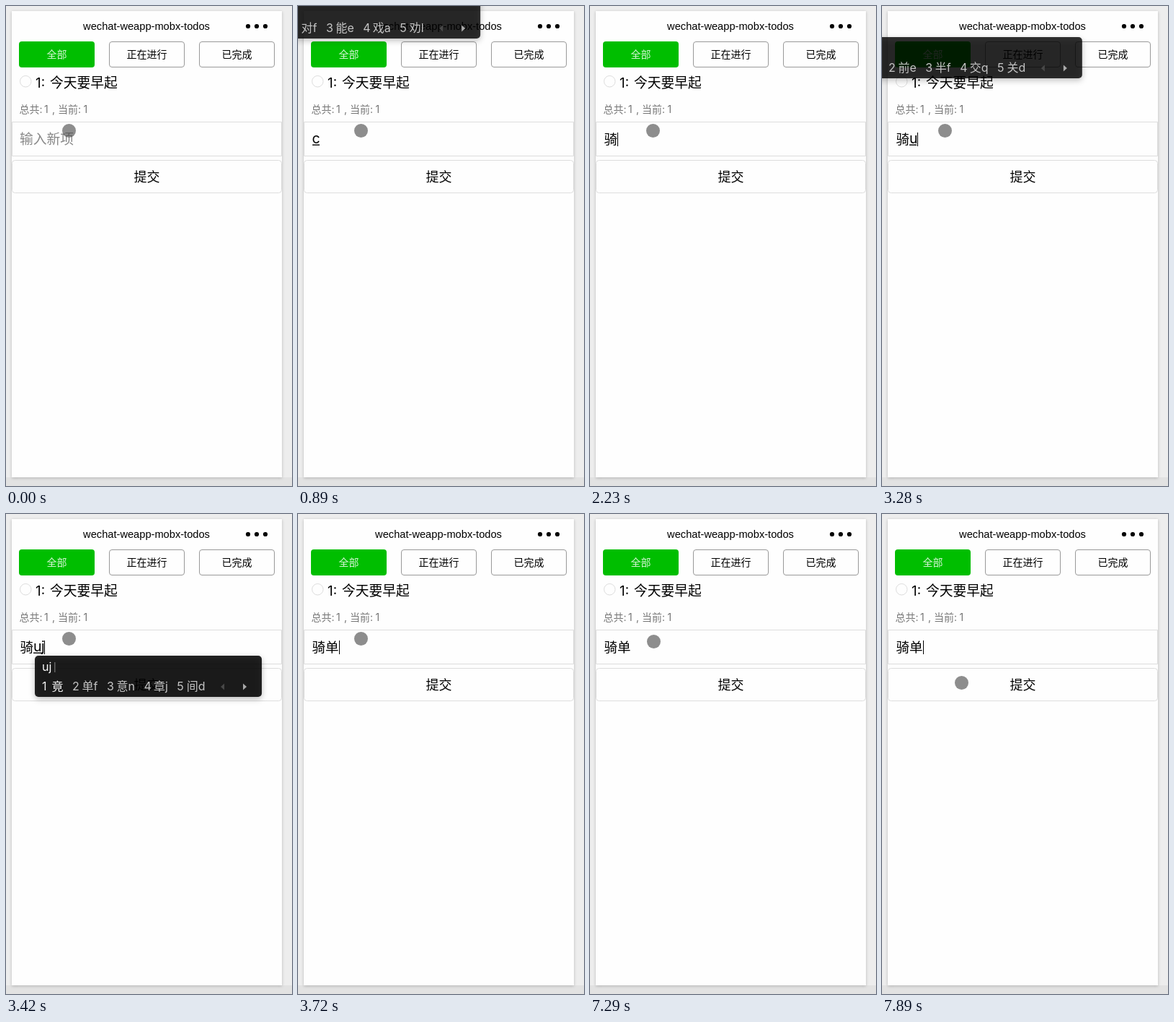
Animation, 397 px wide and 664 px high, one loop 8000 ms. Source, as an HTML page with a canvas:

```html
<!DOCTYPE html>
<html lang="zh-CN">
<head>
<meta charset="utf-8">
<title>todos</title>
<style>
  html, body { margin: 0; width: 100%; height: 100%; overflow: hidden; background: #ededed; }
  canvas { display: block; width: 397px; height: 664px; }
</style>
</head>
<body>
<canvas id="stage"></canvas>
<script>
const LOOP = 8000;
const SANS = "Inter, 'Noto Sans CJK SC', 'Noto Sans CJK', sans-serif";
const canvas = document.getElementById('stage');
const ctx = canvas.getContext('2d');
const scale = window.devicePixelRatio || 1;
canvas.width = 397 * scale;
canvas.height = 664 * scale;

// Input states: text already committed, letters being composed, caret x.
const typing = [
  { at: 0, done: '', keys: '', caret: 19 },
  { at: 440, done: '', keys: 'c', caret: 31,
    popup: { x: -61, y: -12, alpha: .8, list: ['以', '对f', '能e', '戏a', '劝l'] } },
  { at: 1490, done: '', keys: 'cd', caret: 44,
    popup: { x: 22, y: 196, alpha: .86, list: ['参', '骑s', '叁d', '驮y', '畚l'] } },
  { at: 1630, done: '', keys: 'cds', caret: 51,
    popup: { x: 22, y: 196, alpha: .86, list: ['骑', '骑k', '参校u', '参酌g', '骠s'] } },
  { at: 2230, done: '骑', keys: '', caret: 38 },
  { at: 3280, done: '骑', keys: 'u', caret: 49,
    popup: { x: -43, y: 43, alpha: .8, list: ['产', '前e', '半f', '交q', '关d'] } },
  { at: 3420, done: '骑', keys: 'uj', caret: 53,
    popup: { x: 40, y: 196, alpha: .86, list: ['竟', '单f', '意n', '章j', '间d'] } },
  { at: 3570, done: '骑', keys: 'ujf', caret: 58,
    popup: { x: 40, y: 196, alpha: .86, list: ['单', '单j', '阐d', '章程k', '童f'] } },
  { at: 3720, done: '骑单', keys: '', caret: 57 },
];
const caretFlips = [300, 890, 1490, 2080, 2230, 2680, 3130, 4320, 4760, 5210, 5800, 6250, 6690, 7290, 7740];
const pointerPath = [
  [0, 87.5, 172.5], [7290, 88.5, 176.5], [7440, 91.5, 199.5],
  [7590, 101.5, 212.5], [7740, 107.5, 226.5], [7890, 110.5, 233.5],
];

function text(str, x, y, size, color = '#000', align = 'left', family = SANS) {
  ctx.font = `${size}px ${family}`;
  ctx.fillStyle = color;
  ctx.textAlign = align;
  ctx.fillText(str, x, y);
}

function box(x, y, w, h, radius, stroke, fill) {
  ctx.beginPath();
  ctx.roundRect(x, y, w, h, radius);
  if (fill) { ctx.fillStyle = fill; ctx.fill(); }
  if (stroke) { ctx.strokeStyle = stroke; ctx.lineWidth = 1; ctx.stroke(); }
}

function dot(x, y, r, color) {
  ctx.beginPath();
  ctx.arc(x, y, r, 0, 2 * Math.PI);
  ctx.fillStyle = color;
  ctx.fill();
}

function rect(x, y, w, h, color) {
  ctx.fillStyle = color;
  ctx.fillRect(x, y, w, h);
}

function withShadow(color, blur, offsetY, draw) {
  ctx.save();
  ctx.shadowColor = color;
  ctx.shadowBlur = blur * scale;
  ctx.shadowOffsetY = offsetY * scale;
  draw();
  ctx.restore();
}

function drawPage() {
  rect(0, 0, 397, 664, '#ededed');
  rect(0, 652, 397, 12, '#e2e2e2');
  withShadow('rgba(0,0,0,.22)', 4, 1, () => rect(8, 7, 375, 645, '#fefefe'));

  text('wechat-weapp-mobx-todos', 195, 33, 14.65, '#000', 'center', "'Liberation Sans', sans-serif");
  for (const x of [336, 348, 360]) dot(x, 28, 3.1, '#000');

  box(18, 49, 105, 36, 4, null, '#00be00');
  box(143.5, 49.5, 104, 35, 3.5, '#999');
  box(268.5, 49.5, 104, 35, 3.5, '#999');
  text('全部', 70.5, 72.3, 14, '#d5f5d5', 'center');
  text('正在进行', 195.5, 72.3, 14, '#000', 'center');
  text('已完成', 320.5, 72.3, 14, '#000', 'center');

  box(19.5, 96.5, 15.5, 15.5, 7.75, '#ddd');
  text('1:', 41, 113, 18.75);
  text('今天要早起', 61, 113, 18.75);

  const summary = [['总共:', 18.5], ['1', 53], [',', 64], ['当前:', 72], ['1', 107.5]];
  for (const [part, x] of summary) text(part, x, 148, 14, '#777');

  box(8.5, 160.5, 374, 47, 0, '#ddd');
  box(8.5, 213.5, 374, 45, 4, '#ddd');
  text('提交', 195.5, 242.5, 18, '#000', 'center');
}

function drawInput(state, caretOn) {
  const { done, keys, caret } = state;
  if (!done && !keys) text('输入新项', 19, 191, 18.75, '#888');
  text(done, 19.5, 191, 18.5);
  if (keys) {
    const left = done ? 38 : 20;
    const stops = done ? [38, 49, 52] : [19.5, 30.5, 42.5];
    [...keys].forEach((key, i) => text(key, stops[i], 190, key === 's' ? 17 : 19.5));
    rect(left, 191.5, caret - left - 1, 1.4, '#000');
  }
  if (caretOn) rect(caret, 175, 1, 19, '#000');
}

function drawPopup({ x, y, alpha, list }, keys) {
  ctx.font = `16px ${SANS}`;
  let end = x + 10;
  const items = list.map((item, i) => {
    const left = end;
    end += 14 + ctx.measureText(item).width + 12;
    return { item, left, number: i + 1 };
  });
  end -= 12;

  withShadow('rgba(0,0,0,.3)', 9, 3, () =>
    box(x, y, end + 78 - x, 57, 5, null, `rgba(0,0,0,${alpha})`));
  text(keys, x + 10, y + 21, 16, '#fff');
  rect(x + 14 + ctx.measureText(keys).width, y + 9, 1, 14, '#888');

  for (const { item, left, number } of items) {
    const color = number === 1 ? '#f4f4f4' : '#c4c4c4';
    text(number, left, y + 48, 16, color);
    text(item, left + 13.5, y + 48, 16, color);
  }
  drawArrow(end + 21, y + 43, 5, '#484848');
  drawArrow(end + 57, y + 43, -5, '#aaa');
}

function drawArrow(x, y, length, color) {
  ctx.beginPath();
  ctx.moveTo(x, y);
  ctx.lineTo(x + length, y - 4.5);
  ctx.lineTo(x + length, y + 4.5);
  ctx.fillStyle = color;
  ctx.fill();
}

function render(t) {
  ctx.setTransform(scale, 0, 0, scale, 0, 0);
  const state = typing.findLast(s => s.at <= t);
  const [, px, py] = pointerPath.findLast(([at]) => at <= t);
  const caretOn = caretFlips.filter(at => at <= t).length % 2 === 1;

  drawPage();
  drawInput(state, caretOn);
  if (state.popup) drawPopup(state.popup, state.keys);
  dot(px, py, 9.5, 'rgba(80,80,80,.65)');
}

const start = performance.now();
function tick() {
  render((performance.now() - start) % LOOP);
  requestAnimationFrame(tick);
}
tick();
</script>
</body>
</html>
```
